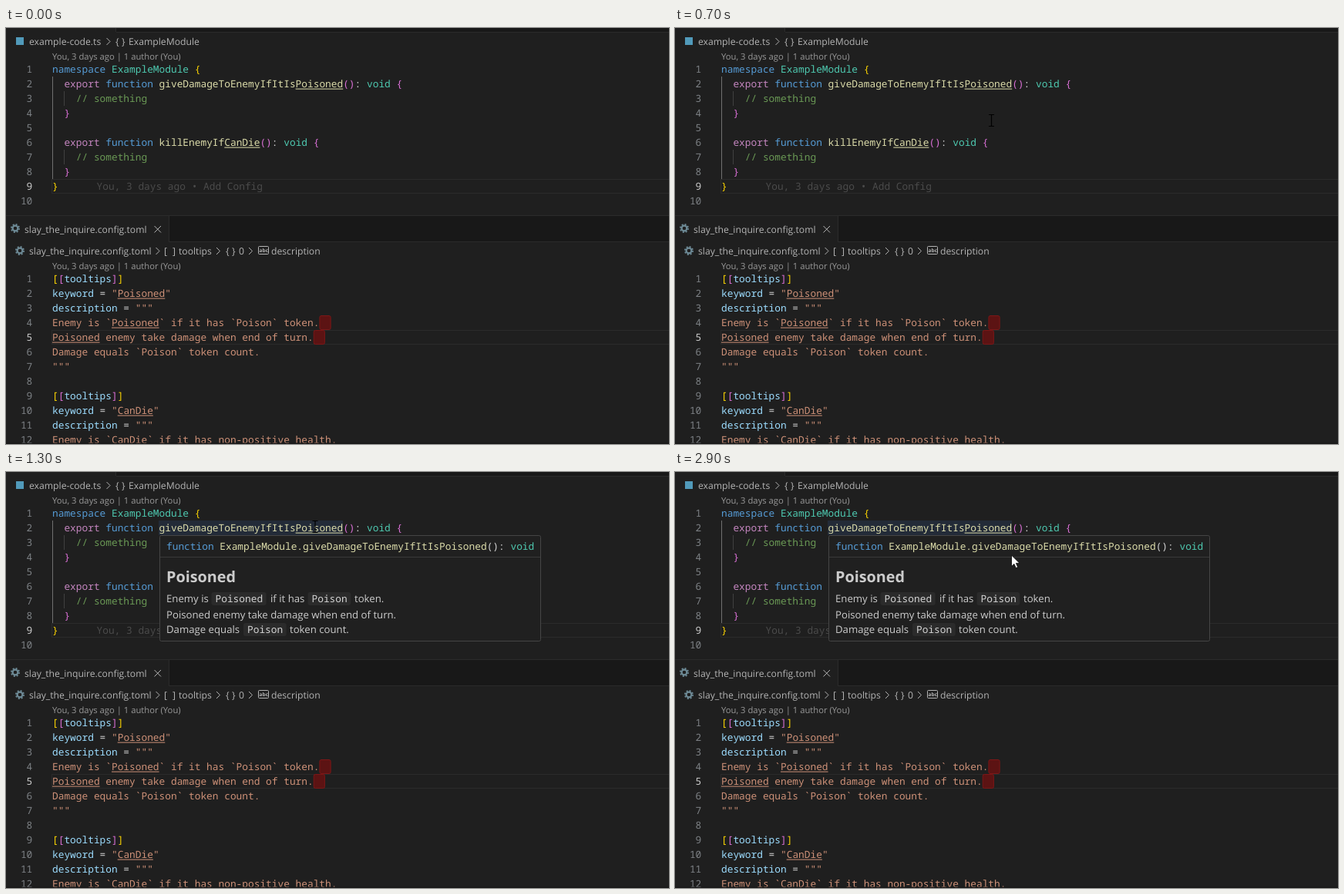
Recreate the animation shown at these times as an HTML page. Size 860 px wide and 540 px high, loop 3.1 s.

```html
<!DOCTYPE html>
<html lang="en">
<head>
<meta charset="utf-8">
<style>
html, body { margin: 0; width: 100%; height: 100%; overflow: hidden; background: #1f1f1f; }
svg { display: block; }
text { white-space: pre; text-rendering: geometricPrecision; font: 12.2px "Open Sans", "Noto Sans", sans-serif; fill: #b4b4b4; }
text.mono { font: 12.83px "Noto Sans Mono", "DejaVu Sans Mono", monospace; fill: #d4d4d4; }
text.lens { font-size: 11.25px; fill: #999; }
text.tip { font-size: 13.2px; fill: #ccc; }
text.head { font-size: 19.8px; font-weight: 700; fill: #ccc; }
text.num { text-anchor: end; fill: #7d8185; }
text.num.on { fill: #ccc; }
text.abc { font-size: 6.5px; font-weight: 700; }
.line { fill: none; stroke: #b4b4b4; }
</style>
</head>
<body>
<svg id="stage" width="860" height="540" viewBox="0 0 860 540"></svg>
<script>
const CHAR = 7.698, LINE = 19;
const COLORS = {
  b: '#569cd6', t: '#4ec9b0', k: '#c586c0', f: '#dcdcaa', c: '#6a9955', y: '#ffd700',
  o: '#da70d6', v: '#9cdcfe', s: '#ce9178', w: '#d4d4d4', g: '#4b4b4b'
};

const rect = (x, y, w, h, fill, extra = '') =>
  `<rect x="${x}" y="${y}" width="${w}" height="${h}" fill="${fill}" ${extra}/>`;
const text = (x, y, str, cls = '') => `<text x="${x}" y="${y}" class="${cls}">${str}</text>`;
const path = (d, extra = 'class="line"') => `<path d="${d}" ${extra}/>`;

// Tokens are split by "|"; the first letter is the colour, "_" after it underlines.
function code(x, y, src) {
  let col = 0, spans = '', lines = '';
  for (const token of src.split('|')) {
    const color = COLORS[token[0]], marked = token[1] === '_';
    const str = token.slice(marked ? 2 : 1);
    if (marked) lines += rect(x + col * CHAR, y + 1.6, str.length * CHAR, 1, color);
    spans += `<tspan fill="${color}">${str}</tspan>`;
    col += str.length;
  }
  return text(x, y, spans, 'mono') + lines;
}

const editor = (top, active, rows) => rows.map((row, i) => {
  const y = top + i * LINE;
  return text(34.3, y, i + 1, 'mono num' + (i + 1 === active ? ' on' : '')) + (row && code(60, y, row));
}).join('');

const activeLine = y => rect(59.5, y, 801, 18, 'none', 'stroke="#2b2b2b"');
const chevron = (x, y) => path(`M${x - 2.5} ${y - 4.5}l4.5 4.5l-4.5 4.5`);
const trailing = (cols, y) =>
  rect(60.5 + cols * CHAR, y, 14.2, 18, '#5c1313', 'rx="2" stroke="#7c1717"');
const gear = (x, y) => `<g transform="translate(${x} ${y})" fill="none" stroke="#6d8a96">` +
  '<circle r="3.4" stroke-width="2.2"/><circle r="5.1" stroke-width="1.8" stroke-dasharray="2 2.005"/></g>';

const header = 'y[|o[|vtooltips|o]|y]';
const quotes = 'vdescription|w = |s"""';
const name = 'giveDamageToEnemyIfItIs';

const topPane =
  rect(0, 0, 860, 5, '#181818') + rect(0, 0, 143, 6, '#1f1f1f') +
  rect(143, 5, 717, 1, '#2b2b2b') + rect(142, 0, 1, 5, '#2b2b2b') +
  rect(13, 12, 10, 10, '#519aba') +
  text(30, 22, 'example-code.ts') + chevron(133, 17.5) +
  text(142, 21.5, '{') + text(150, 21.5, '}') + text(159, 22, 'ExampleModule') +
  text(60, 41, 'You, 3 days ago | 1 author (You)', 'lens') +
  activeLine(196.5) +
  rect(60, 63, 1, 133, '#707070') + rect(75, 82, 1, 19, '#404040') + rect(75, 158, 1, 19, '#404040') +
  editor(58, 9, [
    'bnamespace |tExampleModule |y{',
    `k  export |bfunction |f${name}|f_Poisoned|o()|w: |tvoid |o{`,
    'c    // something',
    'o  }',
    '',
    'k  export |bfunction |fkillEnemyIf|f_CanDie|o()|w: |tvoid |o{',
    'c    // something',
    'o  }',
    'y}',
    ''
  ]) +
  code(117.5, 210, 'gYou, 3 days ago • Add Config');

const bottomPane =
  rect(0, 243, 860, 35, '#181818') + rect(0, 243, 860, 1, '#2b2b2b') +
  rect(0, 277, 860, 1, '#2b2b2b') + rect(0, 244, 211, 34, '#1f1f1f') + rect(211, 244, 1, 34, '#2b2b2b') +
  gear(12, 260) + text(24, 266, 'slay_the_inquire.config.toml') +
  path('M192.5 257l8.5 8.5m0 -8.5l-8.5 8.5') +
  gear(18, 289) + text(30, 294, 'slay_the_inquire.config.toml') + chevron(197, 289.5) +
  text(205, 293.5, '[') + text(216, 293.5, ']') + text(224, 294, 'tooltips') + chevron(275.5, 289.5) +
  text(285, 293.5, '{') + text(293, 293.5, '}') + text(302, 294, '0') + chevron(317.5, 289.5) +
  rect(327.5, 283.5, 13, 10, 'none', 'class="line" rx="1"') + text(328.6, 290.8, 'abc', 'abc') +
  text(344, 294, 'description') +
  text(60, 313, 'You, 3 days ago | 1 author (You)', 'lens') +
  activeLine(392.5) + trailing(45, 373.5) + trailing(44, 392.5) +
  editor(330, 5, [
    header,
    'vkeyword|w = |s"|s_Poisoned|s"',
    quotes,
    'sEnemy is `|s_Poisoned|s` if it has `Poison` token.',
    's_Poisoned|s enemy take damage when end of turn.',
    'sDamage equals `Poison` token count.',
    's"""',
    '',
    header,
    'vkeyword|w = |s"|s_CanDie|s"',
    quotes,
    'sEnemy is `|s_CanDie|s` if it has non-positive health.'
  ]) +
  rect(0, 538.5, 860, 1.5, '#181818');

const chip = (x, y, str) =>
  rect(x - 5, y - 13, str.length * CHAR + 9.5, 17, '#2b2b2b', 'rx="3"') + code(x, y, 'w' + str);

const tooltip =
  rect(199.5, 82.5, 494, 137, '#202020', 'rx="2" stroke="#454545"') + rect(200, 110, 493, 1, '#3a3a3a') +
  code(208, 101, `bfunction |fExampleModule.${name}Poisoned|w(): |tvoid`) +
  text(208, 143, 'Poisoned', 'head') +
  text(208, 169, 'Enemy is', 'tip') + chip(271.5, 169, 'Poisoned') +
  text(343, 169, 'if it has', 'tip') + chip(396.5, 169, 'Poison') + text(452, 169, 'token.', 'tip') +
  text(208, 190, 'Poisoned enemy take damage when end of turn.', 'tip') +
  text(208, 209, 'Damage equals', 'tip') + chip(313, 209, 'Poison') + text(368, 209, 'token count.', 'tip');

const stage = document.getElementById('stage');
stage.innerHTML =
  `<g id="mark">${rect(198, 63, 239, 19, '#232b38')}</g>` + topPane + bottomPane +
  `<g id="tooltip">${tooltip}</g>` +
  `<g id="beam">${path('M-3.5 -7.5h3l.5 1l.5 -1h3M0 -7v14M-3.5 7.5h3l.5 -1l.5 1h3', 'fill="none" stroke="#000" stroke-width="1.2"')}</g>` +
  `<g id="arrow" transform="translate(436.5 108)">${path('M0 0V14.6L3.4 11.4L5.7 16.6L8.2 15.5L5.9 10.4H10.5Z', 'fill="#fff" stroke="#111" stroke-width=".9"')}</g>`;

// Pointer stops: start time, x, y
const stops = [[100, 482.5, 335], [300, 363, 221], [500, 390.5, 155], [700, 410.5, 120], [900, 401, 75], [1100, 401, 71]];
const [mark, tip, beam, arrow] = ['mark', 'tooltip', 'beam', 'arrow'].map(id => document.getElementById(id));
const show = (el, on) => el.setAttribute('visibility', on ? 'visible' : 'hidden');

function draw() {
  const t = performance.now() % 3100;
  const stop = stops.filter(s => t >= s[0]).pop();
  show(mark, t >= 1300);
  show(tip, t >= 1300);
  show(beam, stop && t < 2900);
  show(arrow, t >= 2900);
  if (stop) beam.setAttribute('transform', `translate(${stop[1]} ${stop[2]})`);
  requestAnimationFrame(draw);
}
draw();
</script>
</body>
</html>
```
